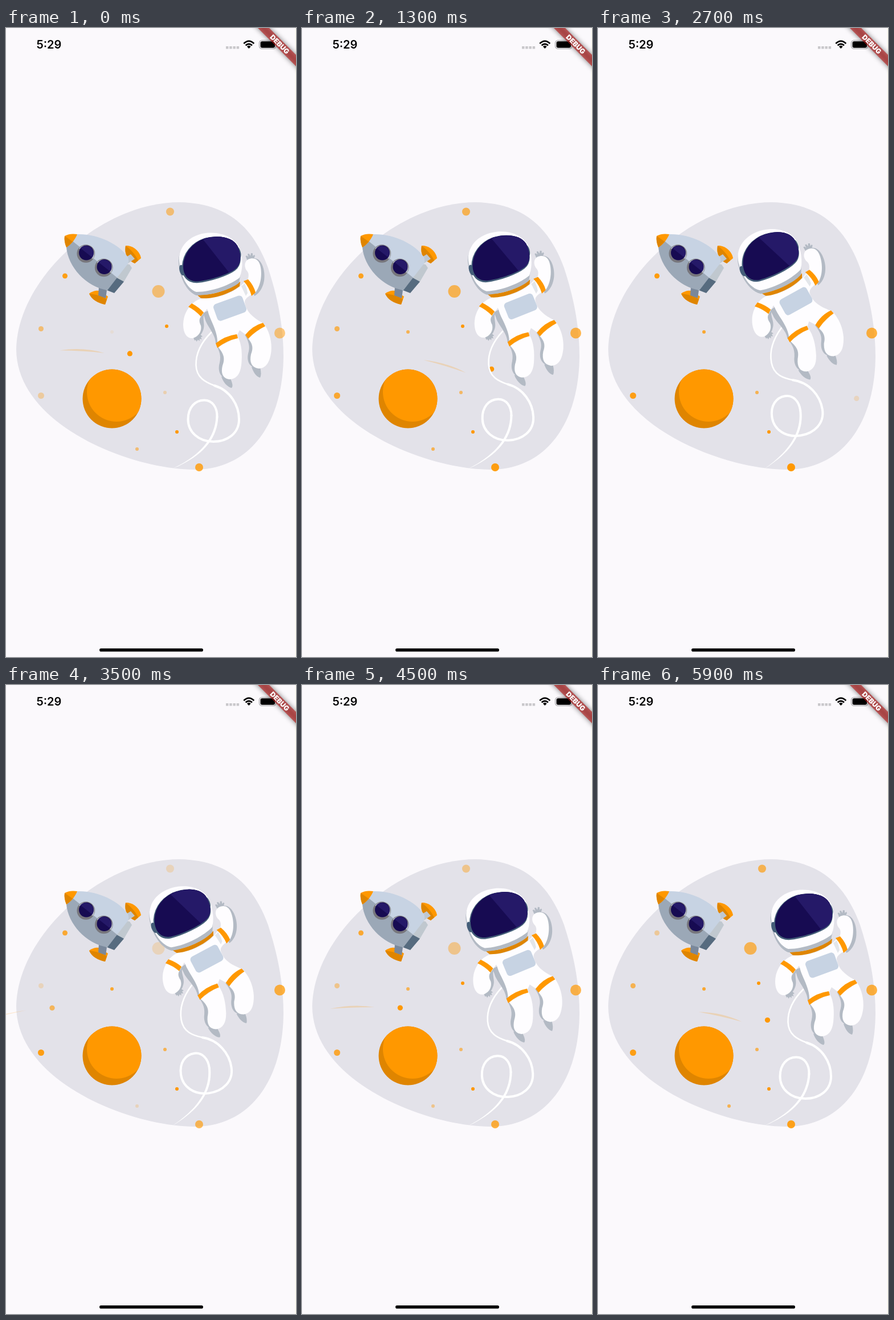
An HTML page for the animation above (6 s loop, 509 by 1101 pixels).

```html
<!DOCTYPE html>
<html lang="en">
<head>
<meta charset="utf-8">
<title>Space walk</title>
<style>
html, body { margin: 0; width: 100%; height: 100%; overflow: hidden; background: #fbf9fc; }
svg { display: block; width: 100vw; height: 100vh; }
text { font-family: Inter, "Liberation Sans", sans-serif; }
.white { fill: #fefdff; }
.grey { fill: #b3bac4; }
.orange { fill: #ff9800; }
.amber { fill: #df8500; }
.pale { fill: #c7d3e3; }
.steel { fill: #9ba8b7; }
.navy { fill: #170b52; }
.violet { fill: #251968; }
.slate { fill: #435d78; }
.rope { fill: none; stroke: #fff; stroke-linecap: round; }
</style>
</head>
<body>
<svg viewBox="0 0 509 1101">
  <defs>
    <clipPath id="planetClip"><circle cx="186" cy="649" r="51.5"/></clipPath>
    <clipPath id="visorClip"><path id="visor" d="M311 417C312 393 328 375 350 368C374 362 397 366 406 381C413 396 414 413 402 422C390 431 360 441 336 443.500C320 444 311 433 311 417Z"/></clipPath>
    <filter id="soft" x="-50%" y="-50%" width="200%" height="200%"><feGaussianBlur stdDeviation="4.700"/></filter>
    <path id="band" d="M442 0L422 -20H442L549 87V107Z"/>
    <g id="window">
      <circle cx="-.8" cy="1.500" r="15.800" fill="#77767c"/>
      <path d="M-13 -8A15.800 15.800 0 0 1 12 11Z" fill="#b4bac4"/>
      <circle r="13" class="navy"/>
      <path d="M-10.200 -8A13 13 0 0 1 10.200 8Z" class="violet"/>
    </g>
  </defs>

  <rect width="509" height="1101" fill="#fbf9fc"/>
  <rect x="507.500" width="1.500" height="1101" fill="#fdfbf0"/>
  <path fill="#e3e2e9" d="M18 562C20 440 165 305 305 305C400 307 438 361 460 420C478 475 487 525 487 575C486 690 430 773 330 773C220 773 18 695 18 562Z"/>

  <g id="planet" clip-path="url(#planetClip)">
    <circle cx="186" cy="649" r="52" class="amber"/>
    <circle cx="194" cy="637" r="52" class="orange"/>
  </g>

  <path id="streak" class="orange" d="M-78 0Q-36 -9 0 0Q-36 -2 -78 0Z"/>
  <g id="dots" class="orange"></g>

  <g id="rocket">
    <path class="orange" d="M210 381C222 380 235 390 237 403L226 412C215 407 207 397 210 381Z"/>
    <path class="amber" d="M210 381C218 387 227 396 232 407L226 412C215 407 207 397 210 381Z"/>
    <path fill="#bfc7d0" d="M204 405L219 396L226 404L211 414Z"/>
    <path class="orange" d="M146 465C150 461 158 459 164 460L179 470L174 484C162 482 150 475 146 465Z"/>
    <path class="amber" d="M146 465C157 466 169 469 177 475L174 484C162 482 150 475 146 465Z"/>
    <path fill="#7a889b" d="M163 453L177 459L175 473L162 468Z"/>
    <path fill="#c0c8cf" d="M212 413L217 414L221 420L207 444L193 438Z"/>
    <path fill="#566b7f" d="M194 437L207 444L190 464L177 459Z"/>
    <path class="pale" d="M117 373L125 361C161 360 198 378 214 401Q217 408 213 414L195 437Z"/>
    <path class="steel" d="M106 384L117 373L195 437L178 459C140 453 109 418 106 384Z"/>
    <path class="orange" d="M103 364C110 360 118 360 125 361C121 371 114 379 106 384C103 377 102 370 103 364Z"/>
    <path class="amber" d="M103 364L117 374Q112 380 106 384C103 377 102 370 103 364Z"/>
    <use href="#window" x="141" y="393.500"/>
    <use href="#window" x="172.500" y="418"/>
  </g>

  <g id="astronaut">
    <path class="rope" stroke-width="2.600" d="M360 533C341 552 333 570 333.500 590C334 612 350 620 366 626"/>
    <path class="rope" stroke-width="4" d="M366 626C393 634 409 660 409 685C409 710 388 724 364 724C338 724 319.500 707 319.500 685C319.500 664 332 651.500 348 651.500C362 651.500 371 664 370.500 681"/>
    <path fill="#fff" d="M368.500 680C367 720 338 750 291 772C342 751 371 722 372.500 680Z"/>

    <!-- legs -->
    <g class="grey">
      <path d="M378 610C381 620 389 629 396 630Q400 626 393 612Z"/>
      <path d="M431 593C434 603 440 611 446 612Q449 606 446 594Z"/>
      <path d="M369 554C374 566 378 572 375 586C371 600 376 613 390 614L386 560Z"/>
      <path d="M419 537C428 552 428 560 425 570C422 584 428 594 440 595L432 545Z"/>
    </g>
    <g class="white">
      <path d="M372 558L407 541C414 554 415 572 413 590C411 606 404 615 392 615C380 613 377 604 380 591C386 576 380 568 372 558Z"/>
      <path d="M424 542L455 521C463 534 467 550 465.500 566C463 586 456 596 443 596C431 594 427 585 430 571C436 557 430 550 424 542Z"/>
    </g>

    <!-- raised arm -->
    <path class="grey" d="M424 408L420.500 399L423 398.500L425.500 401L424 395.500L426.500 395L429 399L430 394L433 394.500L433 399L436 397L437 399L434 406Z"/>
    <path class="grey" d="M432 403C446 401 453 417 453.500 433C454 450 446 464 436 469L428 450Z"/>
    <path class="white" d="M424 441C427 433 426 428 422 424C418 418 418 409 425 405C434 401 443 404 446 415C450 429 448 451 437 464Z"/>

    <!-- lowered arm -->
    <path class="grey" d="M328 540L331 547L333 546L334.500 549L337 545.500L339.500 548L340 544L343.500 545L342 541L345 540L338 534Z"/>
    <path class="grey" d="M338 500L348 500C344 510 350 518 346 529Q342 541 331 544Z"/>
    <path class="white" d="M345 473C325 477 311 499 311 519C311 535 318 544 328 543C338 540 344 531 342 521C338 513 339 508 344 503L354 490Z"/>

    <!-- torso -->
    <path class="grey" d="M346 499L360 492L378 543L368 553C368 535 352 522 349 508Z"/>
    <path class="white" d="M344 473C370 474 395 465 411 452L423 441Q431 451 434 465C425 470 419 474 419 480C421 497 435 508 452 517L421 537L410 529L406 537L371 551C372 530 357 510 354 494Z"/>
    <path class="grey" d="M413 452L419 447Q423 456 424 464L421 469Z" opacity=".35"/>
    <rect class="pale" x="-27" y="-15.500" width="54" height="31" rx="6" transform="translate(393 490.500) rotate(-20)"/>
    <g class="orange">
      <path d="M320 488L326 482Q339 489 347 498L342 505Q332 494 320 488Z"/>
      <path d="M417 443L425 440Q435 451 438 463L431 469Q427 454 417 443Z"/>
      <path d="M368 552Q384 539 405 536L407 543Q387 547 371 560Z"/>
      <path d="M420 537Q433 521 451 516L455 522Q438 530 425 544Z"/>
    </g>

    <!-- helmet -->
    <path class="amber" d="M334 466C360 470 392 458 411 444L410 452C392 466 362 475 342 473Z"/>
    <path class="grey" d="M303 412C301 388 320 363 355 360C385 358 408 373 412 394C416 408 412 433 409 446C393 459 360 468 334 468C316 461 305 436 303 412Z"/>
    <path class="white" d="M304 408C302 384 321 361 355 358.500C385 357 407 371 412 391C417 408 414 428 410 437C395 449 362 462 334 462C317 456 306 432 304 408Z"/>
    <ellipse class="slate" cx="309" cy="424" rx="4.500" ry="9.500" transform="rotate(-14 309 424)"/>
    <ellipse class="slate" cx="408" cy="393" rx="4" ry="10" transform="rotate(-14 408 393)"/>
    <use href="#visor" x="-.8" y="1.300" fill="#435d78" stroke="#435d78" stroke-width="3"/>
    <use href="#visor" class="navy"/>
    <path clip-path="url(#visorClip)" class="violet" d="M341 364L393 430L425 430V355Z"/>
  </g>

  <g id="status">
    <text x="53.500" y="36" font-size="20" font-weight="600">5:29</text>
    <path d="M386 34.200H409.100" stroke="#c9c8cb" stroke-width="4.500" stroke-dasharray="4.500 1.700"/>
    <g fill="none" stroke="#000" stroke-width="2.700">
      <path d="M417.300 27.200Q426.300 18.700 435.300 27.200"/>
      <path d="M420.600 30.600Q426.300 25.400 432 30.600"/>
    </g>
    <path d="M422.900 32.500Q426.300 29.700 429.700 32.500L426.300 36Z"/>
    <rect x="444.500" y="21.500" width="29.500" height="15" rx="4.800" fill="none" stroke="#a5a4a8" stroke-width="1.200"/>
    <rect x="446.500" y="23.300" width="25.500" height="11.400" rx="3.200"/>
  </g>
  <rect x="164" y="1086" width="182" height="5.600" rx="2.800"/>

  <g id="ribbon">
    <use href="#band" filter="url(#soft)" opacity=".5"/>
    <use href="#band" fill="#b71c1c" fill-opacity=".627"/>
    <text transform="translate(480.500 28.500) rotate(45)" y="4.400" text-anchor="middle" font-size="12.100" font-weight="900" fill="#fff">DEBUG</text>
  </g>
</svg>
<script>
const LOOP = 6, CYCLE = 5, START = 2.05;   // seconds
const SWING = 10.2, REST = 0.9145;         // degrees, and the share of the swing as drawn
const $ = id => document.getElementById(id);
const clamp = v => Math.min(1, Math.max(0, v));
const smooth = k => k * k * (3 - 2 * k);
const bell = d => Math.exp(-((d / 0.4) ** 2));

// Brightness rules, each a function of the seconds into the cycle
const steady = () => 1;
const swell = p => 0.6 + 0.1 * p;
const bloom = p => Math.min(0.65, 0.08 + 0.21 * p) * clamp((4.7 - p) / 0.7);
const blink = (high, depth, ...times) => p =>
  high - depth * Math.max(...times.map(t => bell(p - t)));

const STARS = [
  [288, 321.5, 7, bloom],
  [267.5, 461, 11, bloom],
  [61.5, 526.5, 4.5, bloom],
  [230, 737, 3, bloom],
  [282, 522, 3, steady],
  [300, 707, 3, steady],
  [339, 769, 7, swell],
  [103.5, 434, 4.5, blink(0.95, 0.78, 1.05, 2.75)],
  [61.5, 643.5, 5.5, blink(0.92, 0.6, 2.05, 3.85)],
  [186, 532, 3, blink(0.8, 0.72, 2.05, 3.85)],
  [279, 638, 3, blink(0.65, 0.4, 2.05, 3.85)],
  [480.5, 534, 9.5, blink(0.75, 0.25, 2.05, 3.85)]
];

function addDot(x, y, r) {
  const dot = document.createElementNS("http://www.w3.org/2000/svg", "circle");
  dot.setAttribute("cx", x);
  dot.setAttribute("cy", y);
  dot.setAttribute("r", r);
  return $("dots").appendChild(dot);
}

function place(el, transform, opacity = 1) {
  el.setAttribute("transform", transform);
  el.setAttribute("opacity", opacity);
}

const stars = STARS.map(([x, y, r, light]) => ({ dot: addDot(x, y, r), light }));
const spark = addDot(0, 0, 4.6);

function draw(seconds) {
  const p = (seconds + START) % CYCLE;

  for (const { dot, light } of stars) dot.setAttribute("opacity", light(p));

  // The spark flies along a shallow parabola, the streak follows on a steeper one
  const x = 30 + 93 * p - 0.8 * p * p;
  const y = 563.5 + 0.0008 * (x - 128) ** 2;
  place(spark, `translate(${x} ${y})`, clamp(p / 0.9) * clamp((4.95 - p) / 1.1));

  const tipX = x - 45;
  const tipY = 563.5 + 0.0012 * (tipX - 105) ** 2;
  const angle = Math.atan(0.0021 * (tipX - 144)) * 180 / Math.PI;
  const girth = Math.sin(p / CYCLE * Math.PI);
  place($("streak"), `translate(${tipX} ${tipY}) rotate(${angle}) scale(1 ${girth})`,
    0.22 * clamp((4.5 - p) / 1.2));

  // The tether's far end is the pivot
  const swing = smooth(1 - Math.abs(2 * p / CYCLE - 1));
  place($("astronaut"), `rotate(${SWING * (swing - REST)} 292 772)`);
}

function tick() {
  draw(performance.now() / 1000 % LOOP);
  requestAnimationFrame(tick);
}
tick();
</script>
</body>
</html>
```
